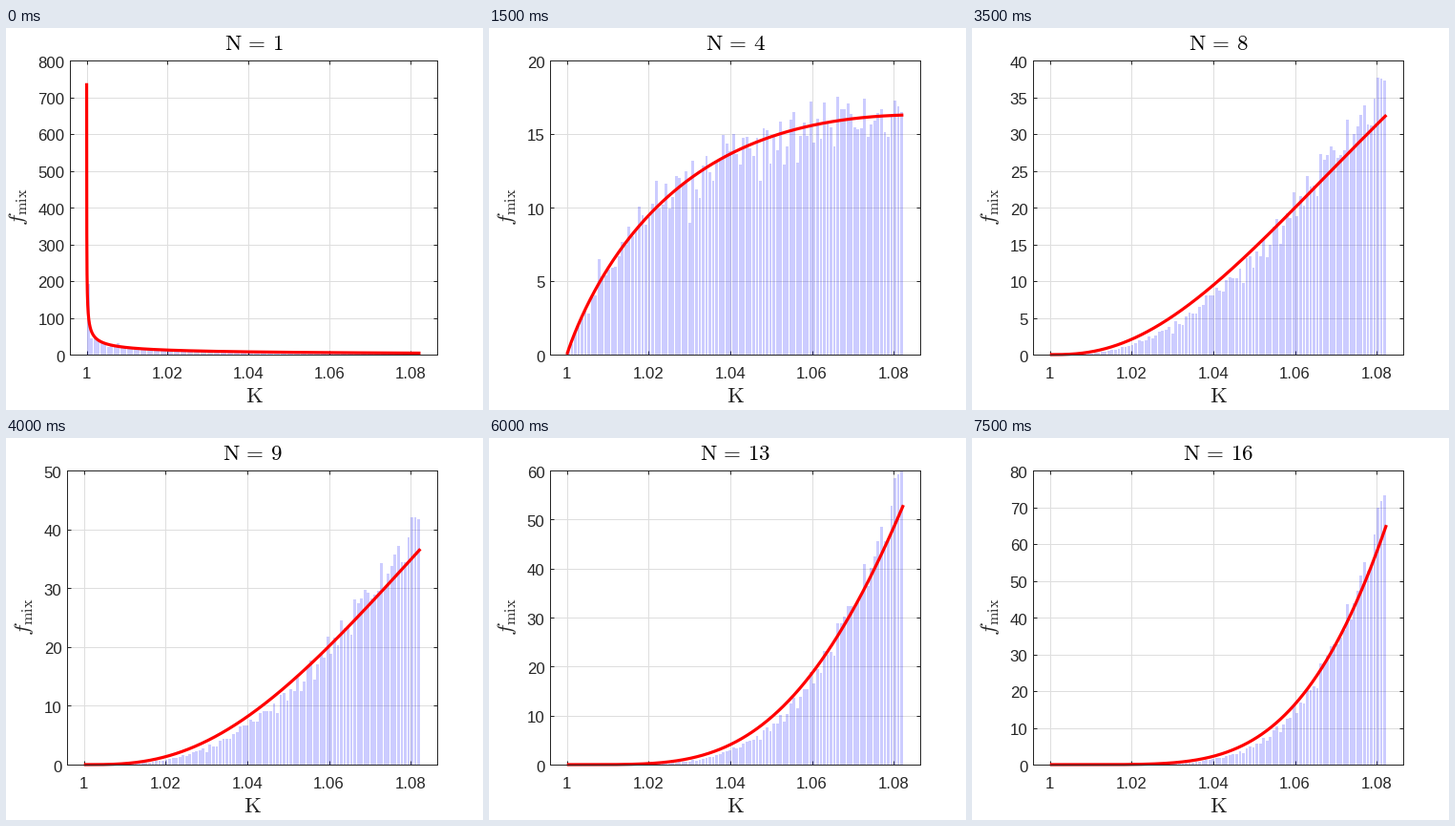
A matplotlib script that plays this animation: 500 by 400 pixels, repeating every 8000 ms.

```python
import numpy as np
import matplotlib.pyplot as plt
from matplotlib.animation import FuncAnimation
from matplotlib.transforms import ScaledTranslation

plt.rcParams["font.family"] = "Liberation Sans"
plt.rcParams["mathtext.fontset"] = "cm"

W, H, DPI = 500, 400, 100
PT = 72 / DPI                  # points per pixel
TOP, BOTTOM, RIGHT = 34, 342, 452
GREY = "#262626"
N_MAX = 16
T_MAX = np.pi / 8
K_MAX = 1 / np.cos(T_MAX)
BINS = 100
SLOPE = 0.283                  # weight of the triangular part of the mixture


def cdf(k):
    t = np.arccos(1 / k) / T_MAX
    return (1 + SLOPE) * t - SLOPE * t ** 2


def pdf(k):
    t = np.arccos(1 / k) / T_MAX
    return (1 + SLOPE - 2 * SLOPE * t) / (T_MAX * k * np.sqrt(k * k - 1))


edges = np.linspace(1, K_MAX, BINS + 1)
step = edges[1] - edges[0]
edge_cdf = np.clip(cdf(edges), 0, 1)
spread = np.linspace(0.11, 0.05, BINS)
noise = 1 + spread * np.random.default_rng(3).normal(size=BINS)

ks = np.linspace(1, K_MAX, 8500)[1:]
curve_cdf, curve_pdf = cdf(ks), pdf(ks)


def max_pdf(n):
    """Density of the largest of n draws."""
    return n * curve_cdf ** (n - 1) * curve_pdf


def bar_heights(n):
    # Sampled maxima lean to the right as n grows
    power = n * (1 + 0.14 * np.clip((n - 4) / 4, 0, 1))
    return np.diff(edge_cdf ** power) / step * noise


def y_ticks(density):
    """Round ticks that leave room for bars above the curve."""
    peak = max(density[0], 1.13 * density[len(density) // 4:].max())
    tick = 100 if peak > 100 else 10 if peak > 40 else 5
    return np.arange(0, np.ceil(peak / tick) + 1, dtype=int) * tick


fig = plt.figure(figsize=(W / DPI, H / DPI), dpi=DPI, facecolor="white")
ax = fig.add_axes([0.1, 0.1, 0.8, 0.8])
ax.set_axisbelow(True)
ax.grid(color="#dedede", linewidth=PT)
ax.tick_params(direction="in", top=True, right=True, length=4 * PT,
               width=PT, color=GREY, labelcolor=GREY, labelsize=16.7 * PT)
ax.tick_params(axis="x", pad=25 * PT)
for spine in ax.spines.values():
    spine.set(color=GREY, linewidth=PT, zorder=4)

margin = 0.05 * (K_MAX - 1)
ax.set_xlim(1 - margin, K_MAX + margin)
x_ticks = np.arange(1, K_MAX, 0.02)
ax.set_xticks(x_ticks, [f"{x:.3g}" for x in x_ticks], va="baseline")
y_text = (ax.get_yaxis_text1_transform(5.5 * PT)[0]
          + ScaledTranslation(0, -1.5 / DPI, fig.dpi_scale_trans))

bars = ax.bar(edges[:-1] + step / 2, np.zeros(BINS), width=0.8 * step,
              color="blue", alpha=0.2, linewidth=0, zorder=2)
curve, = ax.plot([], [], color="red", linewidth=3.2 * PT, zorder=3,
                 solid_capstyle="butt", clip_on=False)


def label(y, text, color, **kw):
    return fig.text(0.5, 1 - y / H, text, color=color, fontsize=23 * PT,
                    ha="center", va="baseline", **kw)


title = label(23, "", "black")
x_label = label(391.5, r"$\mathrm{K}$", GREY)
y_label = label(187.5, r"$f_{\mathrm{mix}}$", GREY, rotation=90,
                rotation_mode="anchor")


def draw(i):
    n = i + 1
    density = max_pdf(n)
    ticks = y_ticks(density)

    # Three-digit labels push the axes to the right
    left, label_x = (67, 19) if ticks[-1] >= 100 else (64, 25)
    ax.set_position([left / W, 1 - BOTTOM / H,
                     (RIGHT - left) / W, (BOTTOM - TOP) / H])
    ax.set_yticks(ticks, [str(v) for v in ticks])
    ax.set_ylim(0, ticks[-1])
    for text in ax.get_yticklabels():
        text.set_transform(y_text)

    for bar, h in zip(bars, bar_heights(n)):
        bar.set_height(h)
    curve.set_data(ks, density)

    title.set_text(r"$\mathrm{N}\hspace{0.17}=\hspace{0.17}\mathrm{%d}$" % n)
    for text in (title, x_label):
        text.set_x((left + RIGHT + 1) / 2 / W)
    y_label.set_x(label_x / W)
    return [*bars, curve, title, x_label, y_label]


anim = FuncAnimation(fig, draw, frames=N_MAX, interval=500,
                     repeat=True, repeat_delay=0, blit=False)
plt.show()
```
